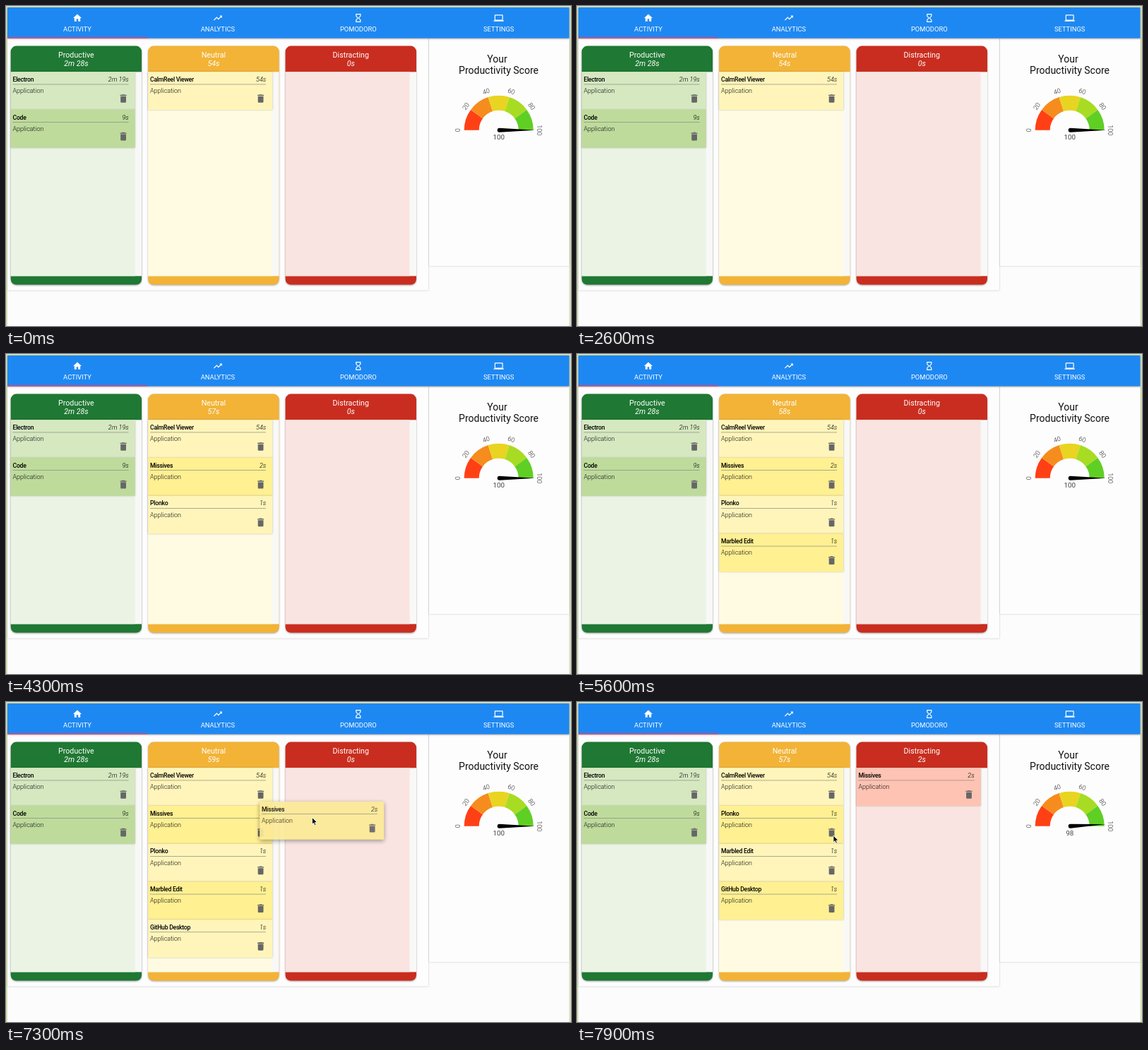
An HTML page that plays this animation: 800x453 px, repeating every 8000 ms.

```html
<!DOCTYPE html>
<html lang="en">
<head>
<meta charset="utf-8">
<title>Activity board</title>
<style>
html, body { margin: 0; width: 100%; height: 100%; overflow: hidden; background: #fdfcfd; }
svg { display: block; width: 800px; height: 453px; font-family: Roboto, Arial, sans-serif; }
.mid { text-anchor: middle; }
.nav { font-size: 9.4px; fill: #fff; }
.head { font-size: 10.7px; fill: #fff; }
.name { font-size: 8.7px; font-weight: 500; letter-spacing: -.28px; }
.time { font-size: 9px; font-style: italic; font-weight: 300; text-anchor: end; }
.kind { font-size: 9px; font-weight: 300; fill: #111; }
.score { font-size: 14px; fill: #111; }
.tick { font-size: 9px; font-weight: 300; fill: #222; }
.value { font-size: 9.8px; fill: #444; }
.shade { filter: drop-shadow(0 1px 1.2px rgba(0,0,0,.35)); }
.soft { filter: drop-shadow(0 .5px .8px rgba(0,0,0,.25)); }
.lift { filter: drop-shadow(0 2px 3px rgba(0,0,0,.4)); opacity: .92; }
</style>
</head>
<body>
<svg id="stage" viewBox="0 0 800 453"></svg>
<script>
const LOOP = 8000, STEP = 100, DROP = 7500, GRAB = 6750;
const CARD_W = 176, CARD_H = 53.7, TOP = 93.3;
const stage = document.getElementById('stage');

const icons = {
  home: 'M10 20v-6h4v6h5v-8h3L12 3 2 12h3v8z',
  trend: 'M16 6l2.29 2.29-4.88 4.88-4-4L2 16.59 3.41 18l6-6 4 4 6.3-6.29L22 12V6z',
  glass: 'M6 2v6l4 4-4 4v6h12v-6l-4-4 4-4V2H6zm10 14.5V20H8v-3.5l4-4 4 4zm-4-5l-4-4V4h8v3.5l-4 4z',
  laptop: 'M20 18c1.1 0 2-.9 2-2V6c0-1.1-.9-2-2-2H4c-1.1 0-2 .9-2 2v10c0 1.1.9 2 2 2H0v2h24v-2h-4zM4 6h16v10H4V6z',
  bin: 'M6 19c0 1.1.9 2 2 2h8c1.1 0 2-.9 2-2V7H6v12zM19 4h-3.5l-1-1h-5l-1 1H5v2h14V4z'
};
const green = { x: 6.7, title: 'Productive', main: '#1f7833', body: '#ebf4e4', cards: ['#d5e8c0', '#bedb9c'] };
const amber = { x: 201.2, title: 'Neutral', main: '#f2b336', body: '#fefbe2', cards: ['#fff5ba', '#fff092'] };
const red = { x: 395.6, title: 'Distracting', main: '#c92d1f', body: '#f9e4e1', cards: ['#ffc3b3', '#ffab91'] };

const productive = [{ name: 'Electron', secs: 139 }, { name: 'Code', secs: 9 }];
const moved = { name: 'Missives', secs: 2, from: 3100 };
const neutral = [
  { name: 'CalmReel Viewer', secs: 54, from: 0 },
  moved,
  { name: 'Plonko', secs: 1, from: 4100 },
  { name: 'Marbled Edit', secs: 1, from: 5100 },
  { name: 'GitHub Desktop', secs: 1, from: 6100 }
];

// Pointer path: time, x, y of the tip
const path = [
  [6300, 292, 385], [6500, 279.5, 196.5], [GRAB, 275.5, 169.5], [7300, 433.5, 163.5],
  [DROP, 470, 165], [7800, 372, 184], [7900, 363, 189]
];

const rect = (x, y, w, h, fill, more = '') =>
  `<rect x="${x}" y="${y}" width="${w}" height="${h}" fill="${fill}" ${more}/>`;
const text = (x, y, cls, str, more = '') => `<text x="${x}" y="${y}" class="${cls}" ${more}>${str}</text>`;
const icon = (name, cx, cy, scale, fill) =>
  `<path d="${icons[name]}" fill="${fill}" transform="translate(${cx} ${cy}) scale(${scale}) translate(-12 -12)"/>`;
const clock = s => (s >= 60 ? Math.floor(s / 60) + 'm ' : '') + s % 60 + 's';
const sum = list => list.reduce((n, item) => n + item.secs, 0);

function card(x, y, item, fill, cls = 'soft') {
  return `<g transform="translate(${x} ${y})" class="${cls}">` +
    rect(0, 0, CARD_W, CARD_H, fill) +
    text(2.8, 13.7, 'name', item.name) +
    text(167, 13.7, 'time', clock(item.secs)) +
    rect(2.8, 17.3, 164, .7, '#8a8a80') +
    text(2.8, 30, 'kind', 'Application') +
    icon('bin', 159.4, 37.7, .65, '#666') + '</g>';
}

function column({ x, title, main, body, cards }, list) {
  const mid = x + 92.7;
  return rect(x, 56.6, 185.4, 338, main, 'rx="8" class="shade"') +
    rect(x, TOP, 185.4, 289, '#f8f8f7') +
    rect(x, TOP, CARD_W, 289, body) +
    text(mid, 72.7, 'head mid', title) +
    text(mid, 84.8, 'head mid', clock(sum(list)), 'font-style="italic"') +
    list.map((item, i) => card(x, TOP + i * CARD_H, item, cards[i % 2])).join('');
}

function navbar() {
  const tabs = [['home', 'ACTIVITY'], ['trend', 'ANALYTICS'], ['glass', 'POMODORO'], ['laptop', 'SETTINGS']];
  return rect(2, 2, 795.5, 43.5, '#1e88f2', 'class="shade"') +
    rect(2, 44.3, 198, 1.6, '#d9487f') +
    tabs.map(([name, label], i) => {
      const x = 101 + i * 198.9;
      return icon(name, x, 17, .6, '#fff') + text(x, 36.3, 'nav mid', label);
    }).join('');
}

function gauge(score, angle) {
  const at = (r, deg) => {
    const a = deg * Math.PI / 180;
    return `${-r * Math.cos(a)} ${-r * Math.sin(a)}`;
  };
  const colors = ['#ff4015', '#f78c1e', '#e8d421', '#a8dc22', '#60cf24'];
  let out = '<g transform="translate(697.7 175.7)">';
  colors.forEach((fill, i) => {
    const a = i * 36, b = a + 36;
    out += `<path fill="${fill}" d="M${at(49, a)}A49 49 0 0 1 ${at(49, b)}L${at(28, b)}A28 28 0 0 0 ${at(28, a)}z"/>`;
  });
  for (let i = 0; i < 6; i++) {
    out += text(0, -54.5, 'tick mid', i * 20, `transform="rotate(${i * 36 - 90})"`);
  }
  return out + `<path d="M51 0L1 -3A3 3 0 1 0 1 3z" transform="rotate(${-angle})"/>` +
    text(0, 13.8, 'value mid', score) + '</g>';
}

function pointer(t) {
  if (t < path[0][0]) return null;
  const i = path.findIndex(p => p[0] > t);
  if (i < 0) return path.at(-1).slice(1);
  const [t0, x0, y0] = path[i - 1], [t1, x1, y1] = path[i];
  const k = (t - t0) / (t1 - t0);
  return [x0 + (x1 - x0) * k, y0 + (y1 - y0) * k];
}

function scene(t) {
  const dropped = t >= DROP;
  const listed = neutral.filter(item => t >= item.from && !(dropped && item === moved));
  const turn = dropped ? 3 * Math.min(1, (t - DROP) / 400) : 0;
  const tip = pointer(t);
  let out = rect(0, 0, 800, 453, '#d3dfb9') + rect(2, 2, 795.5, 451, '#fdfcfd') +
    rect(2, 46, 596, 356.5, '#fefdfe', 'class="soft"') +
    rect(599, 46, 198.5, 322, '#fefdfe', 'class="soft"') +
    navbar() +
    column(green, productive) + column(amber, listed) + column(red, dropped ? [moved] : []) +
    text(695.5, 79.8, 'score mid', 'Your') + text(697.5, 96.3, 'score mid', 'Productivity Score') +
    gauge(dropped ? 98 : 100, turn);
  if (t > GRAB && !dropped) {
    const [, gx, gy] = path[2];
    out += card(amber.x + tip[0] - gx, TOP + CARD_H + tip[1] - gy, moved, '#fcea97', 'lift');
  }
  if (tip) {
    out += `<path d="M0 0V9.6L2.2 7.6 3.7 11 5.4 10.2 3.9 7H7z" stroke="#fff" stroke-width=".8" transform="translate(${tip})"/>`;
  }
  return out;
}

let last = -1;
function frame() {
  const t = Math.floor(performance.now() % LOOP / STEP) * STEP;
  if (t !== last) stage.innerHTML = scene(last = t);
  requestAnimationFrame(frame);
}
frame();
</script>
</body>
</html>
```
